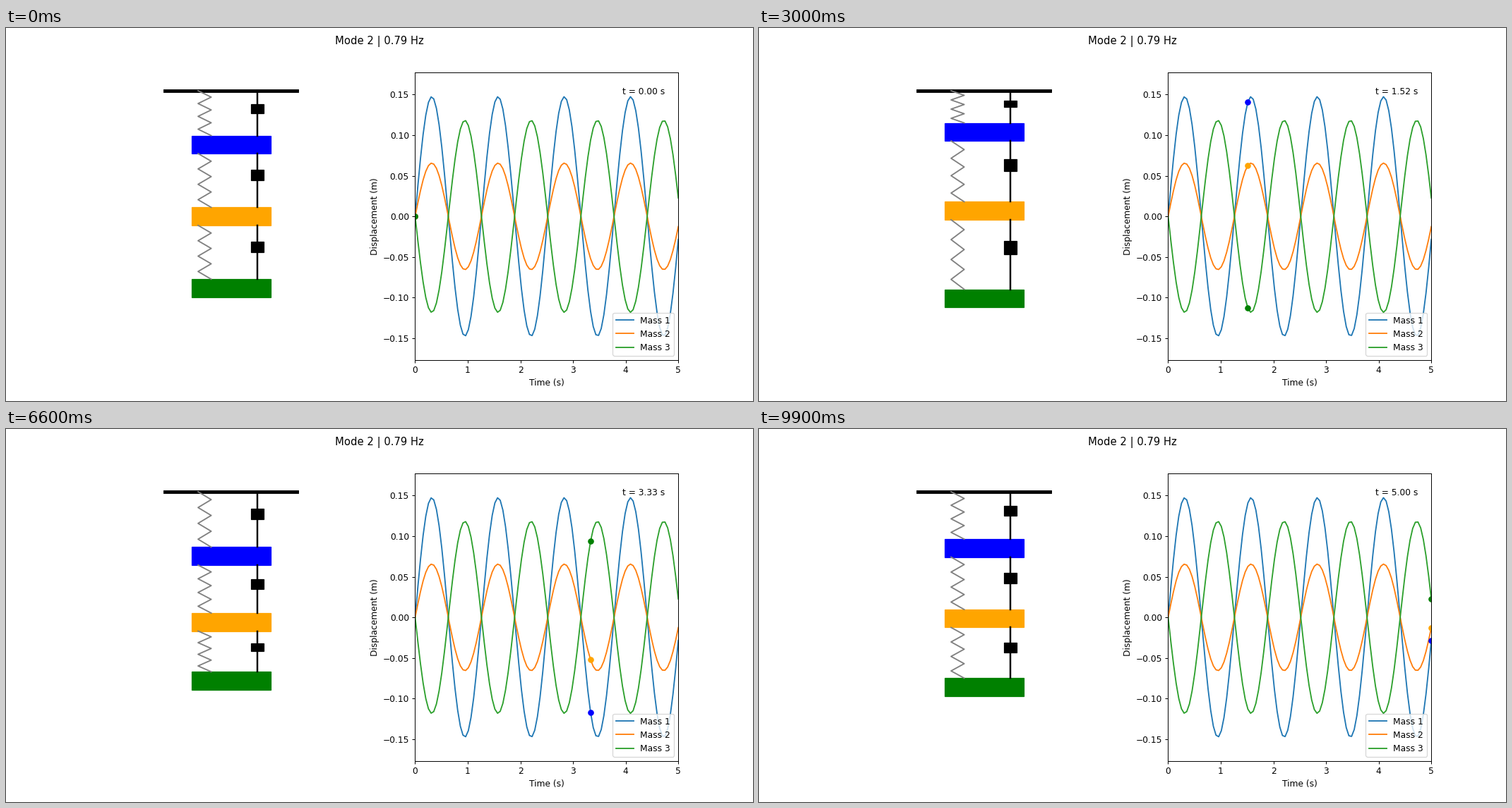
A matplotlib script for the animation above (10000 ms loop, 1058 px wide and 529 px high).

```python
import numpy as np
import matplotlib.pyplot as plt
from matplotlib.animation import FuncAnimation
from matplotlib.patches import Rectangle

plt.rcParams["font.family"] = "DejaVu Sans"

FRAMES, INTERVAL = 100, 100
N, MODE = 3, 2
K_OVER_M = 16.0
AMP = 0.2
REST = np.array([-0.6, -1.4, -2.2])
HALF_H, HALF_W = 0.1, 0.3
COLORS = ["blue", "orange", "green"]

# Mode of a fixed-free chain of equal masses and springs
angle = (2 * MODE - 1) * np.pi / (2 * N + 1)
omega = 2 * np.sqrt(K_OVER_M) * np.sin(angle / 2)
shape = np.sin(angle * np.arange(1, N + 1))
shape /= np.linalg.norm(shape)

time = np.linspace(0, 5, FRAMES)
disp = AMP * np.outer(shape, np.sin(omega * time))

fig, (ax, plot) = plt.subplots(1, 2, figsize=(12, 6), dpi=88.1667)
fig.suptitle(f"Mode {MODE} | {omega / (2 * np.pi):.2f} Hz")

# Mechanical model
ax.set_xlim(-1, 1)
ax.set_ylim(-3, 0.2)
ax.axis("off")
ax.plot([-0.5, 0.5], [0, 0], "k-", lw=4)

masses, springs, rods, pots = [], [], [], []
for color in COLORS:
    masses.append(ax.add_patch(
        Rectangle((-HALF_W, 0), 2 * HALF_W, 2 * HALF_H, color=color)))
    springs.append(ax.plot([], [], color="gray", lw=1.5)[0])
    rods.append(ax.plot([], [], "k-", lw=2)[0])
    pots.append(ax.add_patch(Rectangle((0.15, 0), 0.1, 0.1, color="black")))
zigzag = np.tile([-0.25, -0.15], 4)

# Displacement plot
for i in range(N):
    plot.plot(time, disp[i], label=f"Mass {i + 1}")
dots = [plot.plot([], [], "o", color=c)[0] for c in COLORS]
limit = 1.2 * np.abs(disp).max()
plot.set_xlim(0, 5)
plot.set_ylim(-limit, limit)
plot.set_xlabel("Time (s)")
plot.set_ylabel("Displacement (m)")
plot.legend(loc="lower right")
clock = plot.text(0.95, 0.95, "", transform=plot.transAxes,
                  ha="right", va="top")


def update(frame):
    top = 0.0
    for i in range(N):
        center = REST[i] + disp[i, frame]
        end = center + HALF_H
        gap = top - end
        masses[i].set_y(center - HALF_H)
        springs[i].set_data(zigzag, np.linspace(top, end, len(zigzag)))
        rods[i].set_data([0.2, 0.2], [top, end])
        pots[i].set_y(top - 0.5 * gap)
        pots[i].set_height(0.2 * gap)
        dots[i].set_data([time[frame]], [disp[i, frame]])
        top = center - HALF_H
    clock.set_text(f"t = {time[frame]:.2f} s")
    return [*masses, *springs, *rods, *pots, *dots, clock]


anim = FuncAnimation(fig, update, frames=FRAMES, interval=INTERVAL,
                     init_func=lambda: update(0), repeat=True)
plt.show()
```
